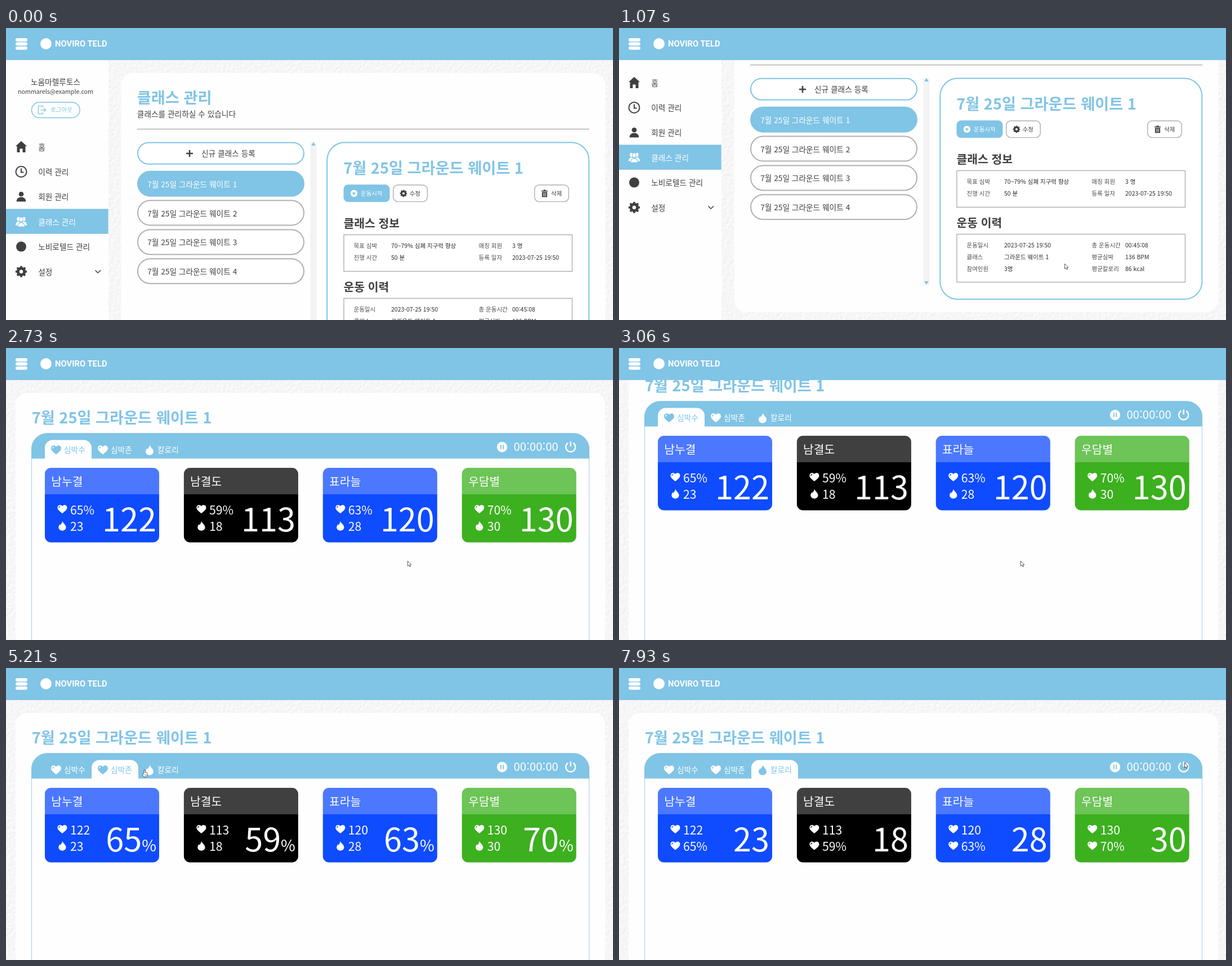
These frames come from a looping animation (1078x519 px, 8000 ms). An HTML page:

```html
<!DOCTYPE html>
<html lang="ko">
<head>
<meta charset="utf-8">
<title>Class manager</title>
<style>
  html, body { margin: 0; width: 100%; height: 100%; overflow: hidden; background: #f7f7f7; }
  svg { position: absolute; left: 0; top: 0; width: 1078px; height: 519px; }
  #paper { will-change: transform; }
  text { font-family: "Noto Sans CJK KR", "Noto Sans KR", "Noto Sans CJK", "Noto Sans", sans-serif; white-space: pre; }
  .brand { font-family: Roboto, Inter, sans-serif; }
</style>
</head>
<body>
<svg id="paper" viewBox="0 0 1078 519">
  <filter id="grain" x="0" y="0" width="1" height="1" color-interpolation-filters="sRGB">
    <feTurbulence type="fractalNoise" baseFrequency=".18" numOctaves="2" seed="4"/>
    <feDiffuseLighting surfaceScale=".16" diffuseConstant="1.115" lighting-color="#fff">
      <feDistantLight azimuth="225" elevation="60"/>
    </feDiffuseLighting>
  </filter>
  <rect width="1078" height="519" filter="url(#grain)"/>
</svg>
<svg id="stage" viewBox="0 0 1078 519"></svg>
<script>
const LOOP = 8000;
const BLUE = '#80c4e6', DARK = '#3f3f3f', GREY = '#b0b0b0', WHITE = '#fff';
const BODY = 13.7, SMALL = 10.5, HEAD = 20.4, TITLE_SIZE = 27.2;

// Markup helpers
const rect = (x, y, w, h, r, fill, stroke = 'none', sw = 1) =>
  `<rect x="${x}" y="${y}" width="${w}" height="${h}" rx="${r}" fill="${fill}" stroke="${stroke}" stroke-width="${sw}"/>`;
const path = (d, fill, stroke = 'none', sw = 1) =>
  `<path d="${d}" fill="${fill}" stroke="${stroke}" stroke-width="${sw}"/>`;
const line = (d, color, sw) => path(d, 'none', color, sw);
const circle = (x, y, r, fill, stroke = 'none', sw = 1, extra = '') =>
  `<circle cx="${x}" cy="${y}" r="${r}" fill="${fill}" stroke="${stroke}" stroke-width="${sw}" ${extra}/>`;
const text = (s, x, y, size, fill = DARK, weight = 400, anchor = 'start') =>
  `<text x="${x}" y="${y}" font-size="${size}" fill="${fill}" font-weight="${weight}" text-anchor="${anchor}">${s}</text>`;
const at = (x, y, body, scale = 1) => `<g transform="translate(${x} ${y}) scale(${scale})">${body}</g>`;
const group = (id, body) => `<g id="${id}">${body}</g>`;

// Icons, centred on the origin
const person = (c, edge = 'none', sw = 0) => circle(0, -4.6, 4.3, c, edge, sw) +
  path('M-8.3 8.6C-8.3 3-4.5 1.6-2 1H2C4.5 1.6 8.3 3 8.3 8.6Z', c, edge, sw);
const icons = {
  home: c => path('M0-10L-10-1H-7.5V10H-2.5V3.5H2.5V10H7.5V-1H10Z', c),
  clock: c => circle(0, 0, 9.5, 'none', c, 2) + line('M0-6V1H4.5', c, 2),
  person,
  group: c => at(-5, -.8, person(c), '.6 .85') + at(5, -.8, person(c), '.6 .85') +
    at(0, .6, person(c, BLUE, 1.3), '.76 1'),
  disc: c => circle(0, 0, 9, c),
  gear: c => circle(0, 0, 5.7, 'none', c, 5) +
    circle(0, 0, 8.5, 'none', c, 3.2, 'pathLength="16" stroke-dasharray="1" stroke-dashoffset=".5"'),
  heart: (c, back) => path('M0 8C-3 5-9 1.5-9-3C-9-6-6.8-8-4.3-8C-2.3-8-.8-7 0-5.6C.8-7 2.3-8 4.3-8C6.8-8 9-6 9-3C9 1.5 3 5 0 8Z', c) +
    line('M-6.4-2.4A2.7 2.7 0 0 1-4-5.2', back, 1.2),
  flame: c => path('M0-9C1-5 7-2 7 3.2A7 6 0 0 1-7 3.2C-7 0-5.5-1-4.5-3C-4-1.5-3-1.5-2.6-2.5C-1.5-4.5-.2-6 0-9Z', c),
  power: c => line('M-4.6-7.2A8.5 8.5 0 1 0 4.6-7.2M0-9.8V-1', c, 2.4),
  logout: c => line('M2-4V-7H-6V7H2V4M-2 0H7M4-3L7 0L4 3', c, 1.3),
  trash: c => path('M-5.5-5H-2V-6.5H2V-5H5.5V-3.4H-5.5ZM-4.6-2.6H4.6V6.5H-4.6Z', c) +
    line('M-2-1V5M0-1V5M2-1V5', WHITE, .8),
  play: c => circle(0, 0, 6.2, c) + path('M-2-3L3.2 0L-2 3Z', BLUE),
  pause: c => circle(0, 0, 9.2, c) + line('M-2.2-3.8V3.8M2.2-3.8V3.8', BLUE, 2)
};
const icon = (name, x, y, c = DARK, scale = 1, back = BLUE) => at(x, y, icons[name](c, back), scale);

const CLASS_NAME = '그라운드 웨이트';
const TITLE = `7월 25일 ${CLASS_NAME} 1`;

function sidebar() {
  const menu = [['home', '홈'], ['clock', '이력 관리'], ['person', '회원 관리'],
    ['group', '클래스 관리'], ['disc', '노비로텔드 관리'], ['gear', '설정']];
  return text('노움마렐루토스', 88, 101, BODY, DARK, 500, 'middle') +
    text('nommarels@example.com', 88, 117, 10.7, DARK, 400, 'middle') +
    rect(45.5, 132, 85.5, 27.5, 13.7, WHITE, BLUE, 1.5) +
    icon('logout', 63.5, 145.7, BLUE) + text('로그아웃', 79.2, 149.3, SMALL, BLUE) +
    rect(0, 321.5, 181.6, 44.4, 0, BLUE) +
    menu.map(([name, label], i) => {
      const y = 211 + i * 44.4, c = i === 3 ? WHITE : DARK;
      const draw = name === 'person' ? at(27, y, person(c)) : icon(name, 27, y, c);
      return draw + text(label, 57.2, y + 5.5, BODY, c);
    }).join('') +
    line('M158.5 430.5L163.2 435.2L168 430.5', DARK, 1.5);
}

function classList() {
  let out = rect(234, 203.8, 295, 38, 19, WHITE, BLUE, 2) +
    line('M320 223H332M326 217V229', DARK, 2.6) + text('신규 클래스 등록', 347, 228.2, BODY);
  for (let i = 0; i < 4; i++) {
    const y = 254.8 + i * 51.8, on = i === 0;
    out += rect(234, y, 295, 44, 22, on ? BLUE : WHITE, on ? BLUE : GREY, 2) +
      text(`7월 25일 ${CLASS_NAME} ${i + 1}`, 251.2, y + 28, BODY, on ? WHITE : DARK);
  }
  return out + rect(540.5, 203, 11, 368, 0, '#f3f3f3') +
    path('M542 209L546 203L550 209ZM542 564L546 570L550 564Z', BLUE);
}

function infoBox(title, y, height, rows) {
  const columns = [617.5, 684, 839.5, 899];
  return text(title, 599.5, y - 12.5, HEAD, DARK, 700) +
    rect(600, y, 405.5, height, 0, WHITE, '#a9a9a9', 1.3) +
    rows.map((row, i) => row.map((s, k) =>
      text(s, columns[k], y + 23.8 + i * 20.6, SMALL, k % 2 ? '#2c2c2c' : '#4c4c4c', k % 2 ? 500 : 400)
    ).join('')).join('');
}

function detail() {
  return rect(570.3, 203.6, 465, 392.4, 31, WHITE, BLUE, 2) +
    text(TITLE, 599.2, 258.8, TITLE_SIZE, BLUE, 700) +
    rect(599.5, 278.3, 82, 31, 8, BLUE) + icon('play', 618, 294, WHITE) + text('운동시작', 630, 298, SMALL, WHITE, 500) +
    rect(687.7, 279, 60.6, 29.6, 8, WHITE, GREY, 1.4) + icon('gear', 706, 294, DARK, .64) + text('수정', 716.7, 298, SMALL, DARK, 500) +
    rect(938.7, 279, 60.6, 29.6, 8, WHITE, GREY, 1.4) + icon('trash', 956.5, 294) + text('삭제', 968, 298, SMALL, DARK, 500) +
    infoBox('클래스 정보', 367.5, 65, [
      ['목표 심박', '70~79% 심폐 지구력 향상', '매칭 회원', '3 명'],
      ['진행 시간', '50 분', '등록 일자', '2023-07-25 19:50']]) +
    infoBox('운동 이력', 480.5, 85.3, [
      ['운동일시', '2023-07-25 19:50', '총 운동시간', '00:45:08'],
      ['클래스', CLASS_NAME + ' 1', '평균심박', '136 BPM'],
      ['참여인원', '3명', '평균칼로리', '86 kcal']]);
}

function managerScene() {
  return rect(0, 57, 182, 462, 0, '#fefefe') +
    group('managerBody',
      rect(204.5, 80, 860, 539, 22, '#fefefe') + sidebar() +
      text('클래스 관리', 232.8, 134.3, TITLE_SIZE, BLUE, 700) +
      text('클래스를 관리하실 수 있습니다', 232.8, 158.2, BODY) +
      line('M233 179.8H1036', '#8c8c8c', 1.1) + classList() + detail());
}

const members = [
  ['남누결', '#0f4bff', '122', '65%', '23'],
  ['남결도', '#000', '113', '59%', '18'],
  ['표라늘', '#0f4bff', '120', '63%', '28'],
  ['우담별', '#3cb01f', '130', '70%', '30']
];

function memberCard([name, color, ...stats], i, tab) {
  const rest = [0, 1, 2].filter(k => k !== tab);
  const big = stats[tab].replace('%', '<tspan font-size="28">%</tspan>');
  return at(69 + i * 246.9, 213,
    rect(0, 0, 203, 132.5, 11, color) +
    path('M0 47V11A11 11 0 0 1 11 0H192A11 11 0 0 1 203 11V47Z', 'rgba(255,255,255,.25)') +
    text(name, 11.2, 31.6, HEAD, WHITE) +
    rest.map((k, row) => {
      const y = 73.5 + row * 29.5;
      return icon(k === 2 ? 'flame' : 'heart', 31, y, WHITE, .95, color) + text(stats[k], 45, y + 9, 21.2, WHITE);
    }).join('') +
    text(big, 198, 113, 57.6, WHITE, 400, 'end'));
}

function tabView(tab) {
  const labels = ['심박수', '심박존', '칼로리'];
  const x0 = 69 + tab * 83;
  return group('tab' + tab,
    path(`M${x0} 197V177.5A14 14 0 0 1 ${x0 + 14} 163.5H${x0 + 69}A14 14 0 0 1 ${x0 + 83} 177.5V197Z`, '#fefefe') +
    labels.map((s, i) => {
      const c = i === tab ? BLUE : WHITE, back = i === tab ? WHITE : BLUE, x = 89 + i * 83;
      return icon(i === 2 ? 'flame' : 'heart', x, 181.3, c, 1, back) + text(s, x + 14, 186, BODY, c, 300);
    }).join('') +
    members.map((m, i) => memberCard(m, i, tab)).join(''));
}

function workoutScene() {
  return group('workoutBody',
    rect(17, 80, 1047, 700, 20, '#fefefe') +
    text(TITLE, 45.7, 134.3, TITLE_SIZE, BLUE, 700) +
    rect(45.5, 151.5, 990, 600, 28, 'none', '#a9cfe8', 1) +
    path('M45 196.5V179.5A28 28 0 0 1 73 151.5H1008A28 28 0 0 1 1036 179.5V196.5Z', BLUE) +
    icon('pause', 881, 176, WHITE) + text('00:00:00', 901.5, 183.3, HEAD, WHITE, 300) +
    icon('power', 1002.7, 176, WHITE) +
    [0, 1, 2].map(tabView).join(''));
}

const header = rect(0, 0, 1078, 57, 0, BLUE) +
  [17.9, 25.3, 32.8].map(y => rect(17, y, 21, 6, 3, WHITE)).join('') +
  circle(71, 28, 10, WHITE) +
  `<text class="brand" x="87" y="33" font-size="14.8" font-weight="700" fill="#fff">NOVIRO TELD</text>`;

const arrow = path('M.4 .6V9.6L2.5 7.7L4 11L5.6 10.3L4.1 7.1H7Z', WHITE, '#333', .8);
const hand = path('M-1.1 7V1.2A1.1 1.1 0 0 1 1.1 1.2V4.6L4.6 5.4Q5.7 5.7 5.5 7L4.9 10.2Q4.7 12.6 3.6 12.6H-.8L-3.6 8.6Q-4 7.4-2.6 7.2Z', WHITE, '#333', .8) +
  line('M1 8V10.6M2.8 8V10.6', '#333', .6);

document.getElementById('stage').innerHTML =
  group('manager', managerScene()) + group('workout', workoutScene()) + header +
  group('cursor', group('arrow', arrow) + group('hand', hand));

// Pointer moves: start, end, steps, x, y, easing
const smooth = p => p * p * (3 - 2 * p);
const easeOut = p => 1 - (1 - p) ** 3;
const moves = [
  [190, 540, 6, 797, 427, easeOut],
  [1070, 1690, 9, 627, 180, smooth],
  [1910, 1910, 1, 636, 179, smooth],
  [2180, 2730, 8, 713, 378, smooth],
  [3920, 3990, 2, 711, 387, smooth],
  [4070, 4610, 8, 210, 181, smooth],
  [5210, 5420, 4, 272, 181, easeOut],
  [6900, 7450, 8, 1069, 183, smooth],
  [7520, 7660, 3, 998, 164, smooth],
  [7790, 7930, 3, 1004, 168, smooth]
];

function pointer(t) {
  let x = 812, y = 519;
  for (const [start, end, steps, toX, toY, ease] of moves) {
    if (t < start) break;
    const k = t >= end ? steps : 1 + Math.floor((t - start) / (end - start) * (steps - 1));
    const p = ease(k / steps);
    x += (toX - x) * p;
    y += (toY - y) * p;
  }
  return { x, y };
}

const $ = id => document.getElementById(id);
const show = (id, on) => $(id).setAttribute('display', on ? 'inline' : 'none');
const move = (id, x, y) => $(id).setAttribute('transform', `translate(${x} ${y})`);
const inside = (p, x0, y0, x1, y1) => p.x >= x0 && p.x <= x1 && p.y >= y0 && p.y <= y1;

function draw(t) {
  const working = t >= 2030;
  const tab = t < 4680 ? 0 : t < 5620 ? 1 : 2;
  show('manager', !working);
  show('workout', working);
  move('managerBody', 0, t < 600 ? 0 : t < 740 ? -57 : -114);
  move('workoutBody', 0, t >= 3060 && t < 3720 ? -57 : 0);
  for (let i = 0; i < 3; i++) show('tab' + i, i === tab);

  const p = pointer(t);
  const link = working ? inside(p, 69, 163, 318, 196) : t >= 740 && inside(p, 599, 164, 681, 195);
  show('cursor', t >= 190);
  show('hand', link);
  show('arrow', !link);
  move('cursor', p.x, p.y);
}

function tick() {
  draw(performance.now() % LOOP);
  requestAnimationFrame(tick);
}
tick();
</script>
</body>
</html>
```
